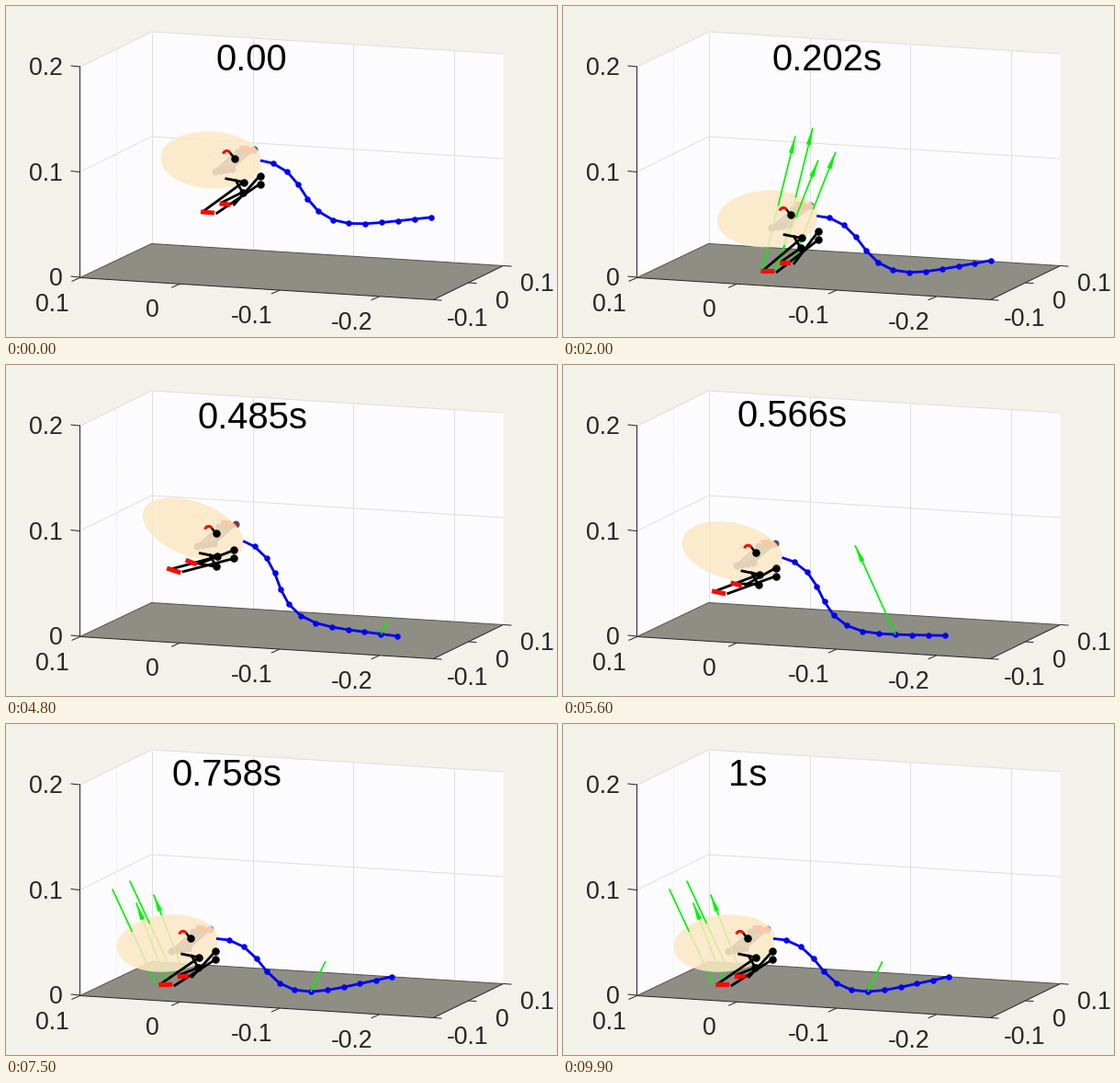
Recreate the animation shown at these times as a matplotlib script. Size 600 px wide and 360 px high, loop 10 s.

```python
import numpy as np
import matplotlib.pyplot as plt
from matplotlib.animation import FuncAnimation

W, H, DPI, N = 600, 360, 100, 100
PX = 72 / DPI
GREEN, RED, BLUE, INK = "#00f400", "#fa0a00", "#0000f0", "#262626"

G = 11233                       # gravity, px/s^2
SPEED = -236                    # forward speed of the leap, px/s
APEX_T, APEX_Y = 0.499, 176.9
T_HIT, T_PUSH, T_AIR, T_LAND = 0.1067, 0.36, 0.435, 0.6033
REST = np.array([222.5, 231])
PITCH = [(0.10, 0), (0.13, -4), (0.2, -4), (0.32, -2),
         (0.485, 13), (0.566, 7), (0.605, -6)]

plt.rcParams["font.family"] = "Liberation Sans"
fig = plt.figure(figsize=(W / DPI, H / DPI), dpi=DPI, facecolor="#f2f2ea")
ax = fig.add_axes([0, 0, 1, 1])
ax.set_xlim(-0.5, W - 0.5)
ax.set_ylim(H - 0.5, -0.5)
ax.axis("off")


def vec(*xy):
    return np.array(xy, dtype=float)


def line(pts, color, width, z, **kw):
    kw.setdefault("solid_capstyle", "butt")
    return ax.plot(*np.transpose(pts), color=color, lw=width * PX, zorder=z, **kw)[0]


def fill(pts, color, z, **kw):
    return ax.fill(*np.transpose(pts), color=color, lw=0, zorder=z, **kw)[0]


def dots(pts, color, size, z):
    return ax.plot(*np.transpose(pts), "o", color=color, ms=size * PX, mew=0,
                   zorder=z)[0]


def text(x, y, s, size, ha="center", color=INK):
    return ax.text(x, y, s, fontsize=size * PX, ha=ha, va="baseline",
                   color=color, zorder=8)


def ramp(t, start, width):
    return np.clip((t - start) / width, 0, 1)


def window(t, start, end, width=0.015):
    return ramp(t, start, width) * (1 - ramp(t, end - width, width))


def scene():
    grid = "#e0e0d8"
    fill([(80, 66), (158, 28), (541, 51), (541, 282), (158, 258), (80, 295)],
         "#fcfcff", 0)
    fill([(80, 295), (158, 258), (541, 282), (465, 319)], "#8e8e84", 2)
    for x in (158, 268, 377, 487):
        dy = (x - 158) * 0.06
        line([(x, 28 + dy), (x, 258 + dy)], grid, 1, 1)
    line([(119.5, 47), (119.5, 276)], grid, 1, 1, ls=":")
    for y in (66, 180):
        line([(80, y), (158, y - 38.5), (541, y - 14.5)], grid, 1, 1)
    line([(80, 295), (158, 258), (541, 282)], "#555550", 1, 2.1)
    line([(80, 65), (80, 295), (465, 319), (541, 282)], INK, 1, 2.2)

    def axis(labels, origin, step, tick, offset, ha="center"):
        for i, s in enumerate(labels):
            p = vec(*origin) + i * vec(*step)
            line([p, p + tick], INK, 1, 2.2)
            text(*(p + offset), s, 26.67, ha)

    axis(["0", "0.1", "0.2"], (80, 294.5), (0, -114.5), (-10, -1), (-19, 9), "right")
    axis(["0.1", "0", "-0.1", "-0.2"], (80, 295), (108.7, 6.8), (-9, 4), (-30, 36))
    axis(["-0.1", "0", "0.1"], (465, 319), (38, -18.5), (9, 0.6), (37, 28))


def flight(t):
    return vec(223 + SPEED * (t - 0.401), APEX_Y + G * (t - APEX_T) ** 2 / 2)


def body(t):
    if t < T_HIT:
        return vec(223 - 5 * t, 167 + G * t * t / 2)
    if t < T_PUSH:
        return REST
    if t > T_AIR:
        return flight(min(t, T_LAND))
    # Hermite blend from rest into the ballistic arc
    span = T_AIR - T_PUSH
    u = (t - T_PUSH) / span
    vel = vec(SPEED, G * (T_AIR - APEX_T))
    return (REST + (flight(T_AIR) - REST) * (3 - 2 * u) * u * u
            + vel * span * (u - 1) * u * u)


def tail_points(c, pitch):
    s = np.arange(12)
    a = np.radians(pitch - 6 + 62 * np.exp(-((s - 3) / 2.7) ** 2))
    steps = np.column_stack([18 * np.cos(a), 18.6 * np.sin(a)])
    steps[0] *= 0.77
    start = c + (67, 3.5 + 67 * np.tan(np.radians(pitch))) - steps[0]
    return np.vstack([start, start + np.cumsum(steps, axis=0)])


def torso(c, slope):
    a = np.linspace(0, 2 * np.pi, 90)
    y = (2 + 55 * slope) * np.cos(a) + 31 * np.sin(a)
    return [fill(c + np.column_stack([55 * np.cos(a), y]), "#fbe8c4", 4, alpha=0.86)]


def far_limbs(p):
    out = []
    for i in range(4):
        a = p + (4 + 6 * i, 12 - i)
        pts = [a, a + (24, -21)]
        out += [line(pts, "#504870", 2.8, 3), dots(pts, "#504870", 8, 3)]
    for q in (p + (35, -14), p + (42, -11)):
        out.append(line([q - (5, 0), q + (5, 0)], RED, 5, 3.1))
    return out


def near_limbs(hip, feet, slope):
    knees = hip + [(53, 17), (53, 26), (35, 24), (34, 35)]
    heel, toe = (-5, -1), (9, 1.5)
    ends = [feet[1] + toe, feet[0] + toe, feet[0] + heel, feet[1] + heel]
    pairs = list(zip(ends, knees))
    pairs += [(hip + (15, 20), knees[2]), (hip + (26, 21), knees[3])]
    out = [line(p, "black", 2.8, 5) for p in pairs]
    out.append(dots(knees, "black", 8.5, 5))
    for f, r in zip(feet, (7.5, 6)):
        d = vec(r, 0.6 + 8 * slope)
        out.append(line([f - d, f + d], RED, 5, 5.1))
    return out


def head(p):
    a = np.radians(np.linspace(190, 330, 8))
    arc = p + (17, -6) + 4 * np.column_stack([np.cos(a), np.sin(a)])
    eye = p + (25, -2)
    return [line(arc, RED, 3, 5.1), line([arc[-1], eye], "black", 2.5, 5.2),
            dots([eye], "black", 8.5, 5.2)]


def arrow(start, force, split=0.0, tipped=True):
    """Force arrow; the part below `split` passes behind the torso."""
    size = np.hypot(*force)
    if size < 3:
        return []
    mid, tip = start + split * force, start + force
    out = [line([start, mid], GREEN, 1.7, 3.5), line([mid, tip], GREEN, 1.7, 6)]
    if tipped and size > 40:
        u = force / size
        side = vec(-u[1], u[0]) * 2.6
        base = tip - 19 * u
        out.append(fill([tip, base + side, base - side], GREEN, 6))
    return out


def foot_forces(t, feet):
    out = []
    stand, land = window(t, T_HIT, 0.43), ramp(t, T_LAND, 0.02)
    lean = vec(-95 * ramp(t, T_PUSH, 0.05), 0)
    for f in feet:
        out += arrow(f + (-6, -1), stand * (vec(36, -146) + lean), 0.48)
        out += arrow(f + (8, -1), stand * (vec(47, -120) * (1.2 - t) + lean), 0.48)
        out += arrow(f + (-10, -1), land * vec(-48, -103), 0.55, tipped=False)
        out += arrow(f + (2, -1), land * vec(-34, -88), 0.8)
    return out


def tail_forces(t, tail):
    contacts = [(0.29, 0.42, 7, vec(7, -13)), (0.42, 0.52, 11, vec(7, -14)),
                (0.54, 0.59, 9, vec(-44, -97)), (0.60, 2, 7, vec(16, -33))]
    out = []
    for start, end, node, force in contacts:
        out += arrow(tail[node], window(t, start, end) * force)
    return out


scene()
moving = []


def draw(i):
    while moving:
        moving.pop().remove()
    t = i / (N - 1)
    c = body(t)
    pitch = np.interp(t, *np.transpose(PITCH))
    rad = np.radians(pitch)
    slope, sin = np.tan(rad), np.sin(rad)
    tuck = ramp(t, 0.41, 0.04)          # legs fold once the push ends

    crown = c + (0, 30 * slope)
    hip = c + (-25 * sin - 3 * tuck, 44 * sin - 4 * tuck)
    feet = c + [(-4, 57), (15, 48)] + vec(-pitch - 4 * tuck, -12 * tuck)
    planted = ramp(t, 0.3, 0.02) * (1 - tuck)
    feet += planted * (REST + [(-1, 56), (17, 47)] - feet)
    tail = tail_points(c, pitch)

    moving.extend(torso(c, slope) + far_limbs(crown)
                  + near_limbs(hip, feet, slope) + head(crown))
    moving.append(line(tail, BLUE, 2.8, 5, solid_joinstyle="round"))
    moving.append(dots(tail[1:], BLUE, 6.5, 5))
    moving.extend(foot_forces(t, feet) + tail_forces(t, tail))
    label = f"{t:.3g}s" if i else "0.00"
    moving.append(text(c[0] + 4.5, 69.5 - 0.07 * (222 - c[0]), label, 40,
                       "left", "black"))
    return moving


anim = FuncAnimation(fig, draw, frames=N, interval=100, repeat=True,
                     repeat_delay=0, init_func=lambda: [], blit=False)
plt.show()
```
